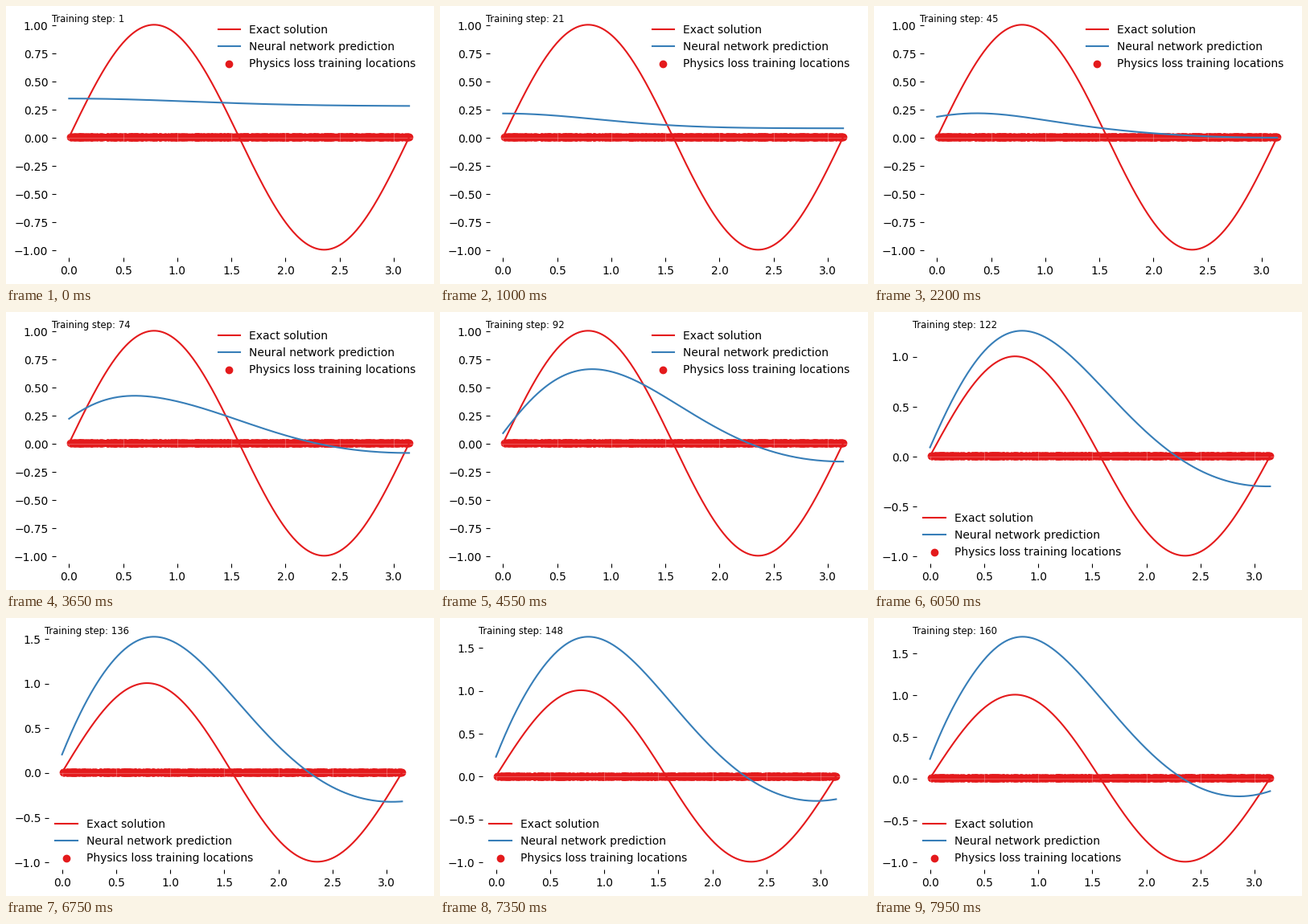
A matplotlib script for the animation above (8000 ms loop, 532 by 346 pixels).

```python
import numpy as np
import matplotlib.pyplot as plt
from matplotlib.animation import FuncAnimation
from matplotlib.transforms import ScaledTranslation

W, H, DPI = 532, 346, 100
AX_W, AX_H, PAD = 465, 308, 10
STEPS, INTERVAL = 160, 50
LIFT = 0.8  # pixels between the curves and the pixel-snapped labels
RED, BLUE = "#e41a1c", "#377eb8"

plt.rcParams["font.family"] = "DejaVu Sans"

# Strength of the learned wave and of the error at x = 0 during training
KEY_STEPS = np.array([1, 21, 45, 74, 109, 136, 160], float)
WAVE = np.array([0, 0, 0.12, 0.5, 1.383, 2.15, 2.4])
LEFT = np.array([0.067, 0.132, 0.164, 0.215, 0, 0.2, 0.23])

x = np.linspace(0, np.pi, 300)
exact = np.sin(2 * x)
wave = np.sin(1.385 * x) / (1 + x**2 / 2.33)


def track(step, values):
    """Smooth Hermite path through the key values."""
    slopes = np.gradient(values, KEY_STEPS)
    i = min(np.searchsorted(KEY_STEPS, step, side="right") - 1,
            len(KEY_STEPS) - 2)
    span = KEY_STEPS[i + 1] - KEY_STEPS[i]
    t = (step - KEY_STEPS[i]) / span
    ease = 3 * t**2 - 2 * t**3
    return ((1 - ease) * values[i] + ease * values[i + 1]
            + span * (t**3 - 2 * t**2 + t) * slopes[i]
            + span * (t**3 - t**2) * slopes[i + 1])


def predict(step):
    level = 0.277 * np.exp(-(step - 1) / 16)
    width = 0.25 + 1.35 * np.exp(-step / 65)
    right = 0.274 * max(0, (step - 100) / 60)**3
    return (level + track(step, WAVE) * wave
            + track(step, LEFT) * np.exp(-(x / width)**2)
            + right * (x / np.pi)**5)


def set_box(left, bottom):
    ax.set_position([left / W, bottom / H, AX_W / W, AX_H / H])


def fit_box():
    """Keep an even margin around the axes and their tick labels."""
    left, bottom = 60, 30
    set_box(left, bottom)
    box = ax.get_tightbbox()
    height = int(box.height + 2 * PAD)
    set_box(left + PAD - box.x0, bottom + H - height + PAD - box.y0)


fig = plt.figure(figsize=(W / DPI, H / DPI), dpi=DPI, facecolor="white")
ax = fig.add_axes([0.1, 0.1, AX_W / W, AX_H / H])
ax.spines[:].set_visible(False)
ax.tick_params(direction="in")
ax.grid(color="white", alpha=0.25, lw=0.8)

rng = np.random.default_rng(7)
points = rng.uniform(0, np.pi, 600)

lifted = ax.transData + ScaledTranslation(0, LIFT / DPI, fig.dpi_scale_trans)
ax.plot(x, exact, color=RED, transform=lifted, label="Exact solution")
curve, = ax.plot(x, predict(1), color=BLUE, transform=lifted,
                 label="Neural network prediction")
ax.scatter(points, np.zeros_like(points), color=RED, transform=lifted,
           label="Physics loss training locations")
ax.set_xlim(-0.05 * np.pi, 1.05 * np.pi)
caption = ax.text(0, 0.968, "", transform=ax.transAxes, fontsize="small")
ax.legend(loc="best", frameon=False)


def update(frame):
    step = frame + 1
    u = predict(step)
    curve.set_ydata(u)
    caption.set_text(f"Training step: {step}")
    low, high = min(-1, u.min()), max(1, u.max())
    margin = 0.05 * (high - low)
    ax.set_ylim(low - margin, high + margin)
    fit_box()
    return curve, caption


anim = FuncAnimation(fig, update, frames=STEPS, interval=INTERVAL,
                     init_func=lambda: update(0), repeat=True, repeat_delay=0)
plt.show()
```
